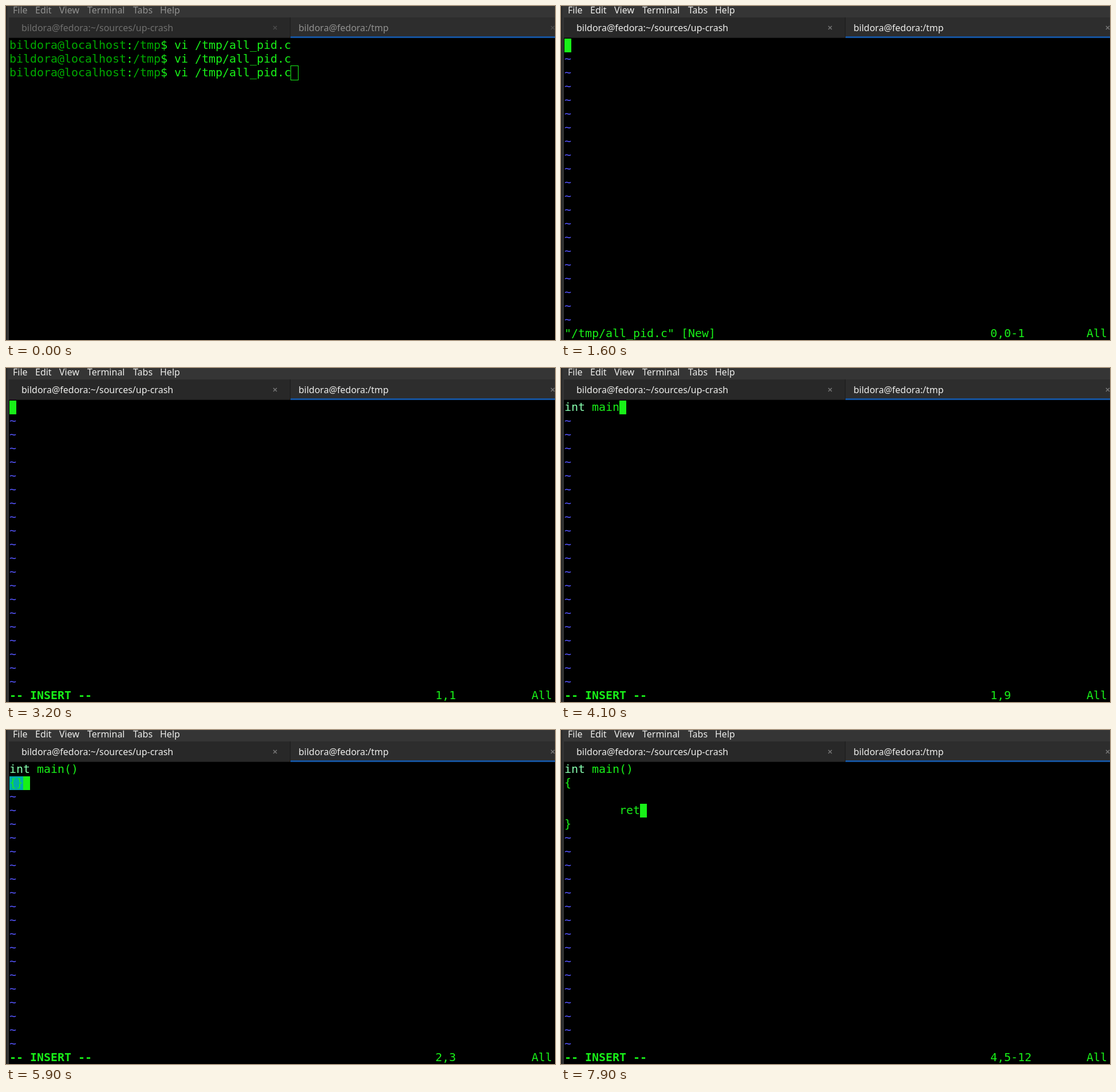
Recreate the animation shown at these times as an HTML page with a canvas. Size 959 by 584 pixels, loop 8 s.

```html
<!DOCTYPE html>
<html lang="en">
<head>
<meta charset="utf-8">
<title>Terminal session</title>
<style>
  html, body { margin: 0; width: 100%; height: 100%; overflow: hidden; background: #000; }
  canvas { display: block; }
</style>
</head>
<body>
<canvas id="stage" width="959" height="584"></canvas>
<script>
const ctx = document.getElementById('stage').getContext('2d');
const LOOP = 8000;
const USER = 'bildora';
const CELL = { x: 6, y: 57, w: 12, h: 24, base: 18 };
const LAST_ROW = 21;
const MONO = '20px "DejaVu Sans Mono", monospace';
const SANS = '16px "Noto Sans", sans-serif';
const C = {
  fg: '#18f018', prompt: '#00aa00', type: '#87ffaf', tilde: '#5555ff', match: '#00aaaa',
  menu: '#353535', tabs: '#282828', active: '#2d2d2d', edge: '#1b1b1b', accent: '#15539e'
};

// Editor states: start time, buffer lines, cursor [row, col], ruler, matched bracket cells
const BRACES = ['int main()', '{'];
const EDITS = [
  [1600, [''], [0, 0], '0,0-1'],
  [2500, [''], [0, 0], '0,1'],
  [2600, ['n'], [0, 1], '1,2'],
  [2700, ['ni'], [0, 2], '1,3'],
  [3000, ['n'], [0, 1], '1,2'],
  [3200, [''], [0, 0], '1,1'],
  [3400, ['in'], [0, 2], '1,3'],
  [3500, ['int'], [0, 3], '1,4'],
  [3700, ['int '], [0, 4], '1,5'],
  [3900, ['int m'], [0, 5], '1,6'],
  [4000, ['int mai'], [0, 7], '1,8'],
  [4100, ['int main'], [0, 8], '1,9'],
  [4600, ['int main('], [0, 9], '1,10'],
  [4700, ['int main()'], [0, 10], '1,11', [[0, 8], [0, 9]]],
  [5200, ['int main()', ''], [1, 0], '2,1'],
  [5900, ['int main()', '{}'], [1, 2], '2,3', [[1, 0], [1, 1]]],
  [6200, ['int main()', '{}'], [1, 1], '2,2', [[1, 0], [1, 1]]],
  [6500, [...BRACES, '}'], [2, 0], '3,1', [[1, 0], [2, 0]]],
  [6600, [...BRACES, '', '}'], [3, 0], '4,1', [[1, 0], [3, 0]]],
  [6700, [...BRACES, '', '', '}'], [4, 0], '5,1', [[1, 0], [4, 0]]],
  [7000, [...BRACES, '', '', '}'], [3, 0], '4,1'],
  [7200, [...BRACES, '', '', '}'], [3, 8], '4,2-9'],
  [7700, [...BRACES, '', '        re', '}'], [3, 10], '4,4-11'],
  [7900, [...BRACES, '', '        ret', '}'], [3, 11], '4,5-12']
];

function box(x, y, w, h, color) {
  ctx.fillStyle = color;
  ctx.fillRect(x, y, w, h);
}

function label(text, x, y, color) {
  ctx.font = SANS;
  ctx.fillStyle = color;
  ctx.fillText(text, x, y);
}

function cellBox(row, col, color) {
  box(CELL.x + col * CELL.w, CELL.y + row * CELL.h, CELL.w, CELL.h, color);
}

function write(text, row, col, color, bold) {
  ctx.font = (bold ? 'bold ' : '') + MONO;
  ctx.fillStyle = color;
  [...text].forEach((ch, i) =>
    ctx.fillText(ch, CELL.x + (col + i) * CELL.w, CELL.y + row * CELL.h + CELL.base));
}

function cross(x, y, color) {
  ctx.strokeStyle = color;
  ctx.lineWidth = 1.5;
  ctx.beginPath();
  ctx.moveTo(x - 3, y - 3);
  ctx.lineTo(x + 3, y + 3);
  ctx.moveTo(x + 3, y - 3);
  ctx.lineTo(x - 3, y + 3);
  ctx.stroke();
}

function drawWindow(focused) {
  box(0, 0, 959, 584, '#000');
  box(0, 0, 5, 584, C.menu);
  box(0, 0, 2, 584, '#242424');
  box(2, 0, 957, 20, C.menu);
  box(5, 20, 954, 35, C.tabs);
  box(497, 20, 462, 35, C.active);
  box(496, 20, 1, 35, C.edge);
  box(5, 55, 492, 1, C.edge);
  box(497, 53, 462, 3, C.accent);

  const bright = focused ? '#eeeeec' : '#919190';
  const dim = focused ? '#eeeeec' : '#6f6f6e';
  const menu = { File: 12, Edit: 51, View: 93, Terminal: 142, Tabs: 222, Help: 269 };
  for (const name in menu) label(name, menu[name], 13, bright);
  label(USER + '@fedora:~/sources/up-crash', 27, 44, dim);
  label(USER + '@fedora:/tmp', 511, 44, bright);
  cross(470, 38, focused ? '#777777' : '#4c4c4c');
  cross(955, 38, focused ? '#777777' : '#4c4c4c');
}

function drawShell(focused) {
  for (let row = 0; row < 3; row++) {
    write(USER + '@localhost', row, 0, C.prompt);
    write(':', row, 17, C.fg);
    write('/tmp', row, 18, C.prompt);
    write('$ vi /tmp/all_pid.c', row, 22, C.fg);
  }
  if (focused) return cellBox(2, 41, C.fg);
  ctx.strokeStyle = C.fg;
  ctx.lineWidth = 1;
  ctx.strokeRect(497.5, 104.5, 13, 25);
}

function drawEditor([start, lines, [row, col], ruler, matches = []]) {
  matches.forEach(([r, c]) => cellBox(r, c, C.match));
  lines.forEach((line, r) => {
    const typed = /^int\b/.test(line) ? 3 : 0;
    write(line.slice(0, typed), r, 0, C.type);
    write(line.slice(typed), r, typed, C.fg);
  });
  for (let r = lines.length; r < LAST_ROW; r++) write('~', r, 0, C.tilde);

  cellBox(row, col, C.fg);
  const under = lines[row][col];
  if (under) write(under, row, col, matches.length ? C.match : '#000');

  if (start < 2500) write('"/tmp/all_pid.c" [New]', LAST_ROW, 0, C.fg);
  else write('-- INSERT --', LAST_ROW, 0, C.fg, true);
  write(ruler, LAST_ROW, 62, C.fg);
  write('All', LAST_ROW, 76, C.fg);
}

function frame(now) {
  const t = now % LOOP;
  const focused = t >= 600;
  drawWindow(focused);
  const edit = EDITS.filter(e => e[0] <= t).pop();
  if (edit) drawEditor(edit);
  else drawShell(focused);
}

const origin = performance.now();
function tick() {
  frame(performance.now() - origin);
  requestAnimationFrame(tick);
}
tick();
</script>
</body>
</html>
```
